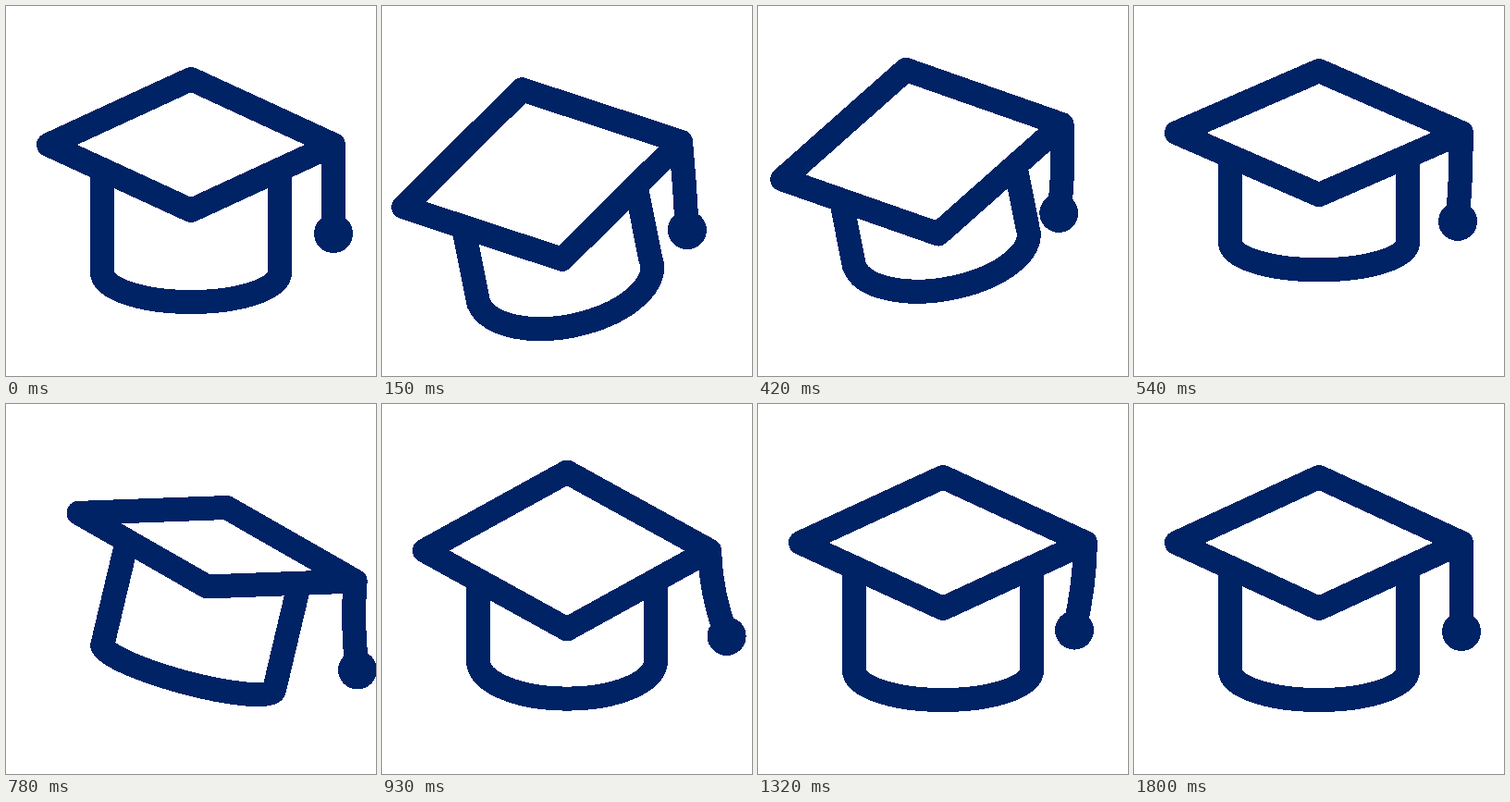
Recreate the animation shown at these times as an HTML page. Size 400 by 400 pixels, loop 3830 ms.

```html
<!DOCTYPE html>
<html lang="en">
<head>
<meta charset="utf-8">
<title>Graduation cap</title>
<style>
  html, body { margin: 0; width: 100%; height: 100%; overflow: hidden; background: #fff; }
  svg { display: block; width: 100%; height: 100%; shape-rendering: crispEdges; }
  path { fill: none; stroke: #002366; stroke-width: 26; stroke-linejoin: round; }
  circle { fill: #002366; }
</style>
</head>
<body>
<svg viewBox="0 0 400 400">
  <path id="board"/>
  <path id="body"/>
  <path id="cord"/>
  <circle id="ball" r="21"/>
</svg>
<script>
const LOOP = 3830, STEP = 30;
const HALF_WIDTH = 154, HALF_HEIGHT = 71, BODY_RADIUS = 96, LEG_AT = 0.377;
const ROUND = 0.5523; // handle length of a Bézier quarter ellipse

const radians = degrees => degrees * Math.PI / 180;
const mix = (p, q, f) => [p[0] + (q[0] - p[0]) * f, p[1] + (q[1] - p[1]) * f];
const el = id => document.getElementById(id);
const draw = (id, d) => el(id).setAttribute('d', d);

// Half sine waves between successive rest times, each with its own peak
function swing(time, rests, peaks) {
  const i = peaks.findIndex((_, n) => time >= rests[n] && time < rests[n + 1]);
  if (i < 0) return 0;
  return peaks[i] * Math.sin(Math.PI * (time - rests[i]) / (rests[i + 1] - rests[i]));
}

// Point at (x, y) in a frame centred on (cx, cy) and turned by degrees
function place(cx, cy, degrees, x, y) {
  const c = Math.cos(radians(degrees)), s = Math.sin(radians(degrees));
  return [cx + x * c - y * s, cy + x * s + y * c];
}

// Half ellipse from centre - u through centre + v to centre + u
function rim(center, u, v) {
  const at = (a, b) => [center[0] + a * u[0] + b * v[0], center[1] + a * u[1] + b * v[1]];
  return `C${at(-1, ROUND)} ${at(-ROUND, 1)} ${at(0, 1)}` +
    `C${at(ROUND, 1)} ${at(1, ROUND)} ${at(1, 0)}`;
}

function render(time) {
  const tilt = swing(time, [0, 540, 930, 1320], [-17.3, 14.8, -6]);
  const boardDrop = swing(time, [0, 450, 690, 1170], [37, -14, 8.5]);
  const bodyDrop = swing(time, [0, 240, 800, 1230], [10, -32.5, -12]);
  const nod = swing(time, [450, 840, 1230], [-6, 21]);
  const sway = swing(time, [0, 270, 765, 1140, 1440, 1620, 1800], [7, -4, 19, -12.6, 9, -3]);

  const halfHeight = HALF_HEIGHT - 1.75 * tilt + nod;
  const corner = (x, y) => place(200 + 2.03 * tilt, 150 + boardDrop, tilt, x, y);
  const top = corner(0, -halfHeight), bottom = corner(0, halfHeight);
  const left = corner(-HALF_WIDTH, 0), right = corner(HALF_WIDTH, 0);
  draw('board', `M${top}L${right}L${bottom}L${left}Z`);

  const center = [200 - 0.2 * Math.abs(tilt), 288 + bodyDrop];
  const across = place(0, 0, 1.1 * tilt, BODY_RADIUS, 0);
  const depth = 32 + 0.6 * (halfHeight - HALF_HEIGHT);
  const down = [-depth * Math.tan(radians(1.7 * tilt)), depth];
  const rimLeft = [center[0] - across[0], center[1] - across[1]];
  draw('body', `M${mix(left, bottom, LEG_AT)}L${rimLeft}` +
    `${rim(center, across, down)}L${mix(right, bottom, LEG_AT)}`);

  const end = [right[0] + sway, right[1] + 96 - 0.01 * sway * sway];
  const middle = mix(right, end, 0.5);
  const bend = -0.42 * sway - 0.3 * tilt;
  draw('cord', `M${right}Q${middle[0] + bend} ${middle[1]} ${end}`);
  el('ball').setAttribute('cx', end[0]);
  el('ball').setAttribute('cy', end[1]);
}

const start = performance.now();
function tick() {
  const time = (performance.now() - start) % LOOP;
  render(Math.floor(time / STEP) * STEP);
  requestAnimationFrame(tick);
}
tick();
</script>
</body>
</html>
```
